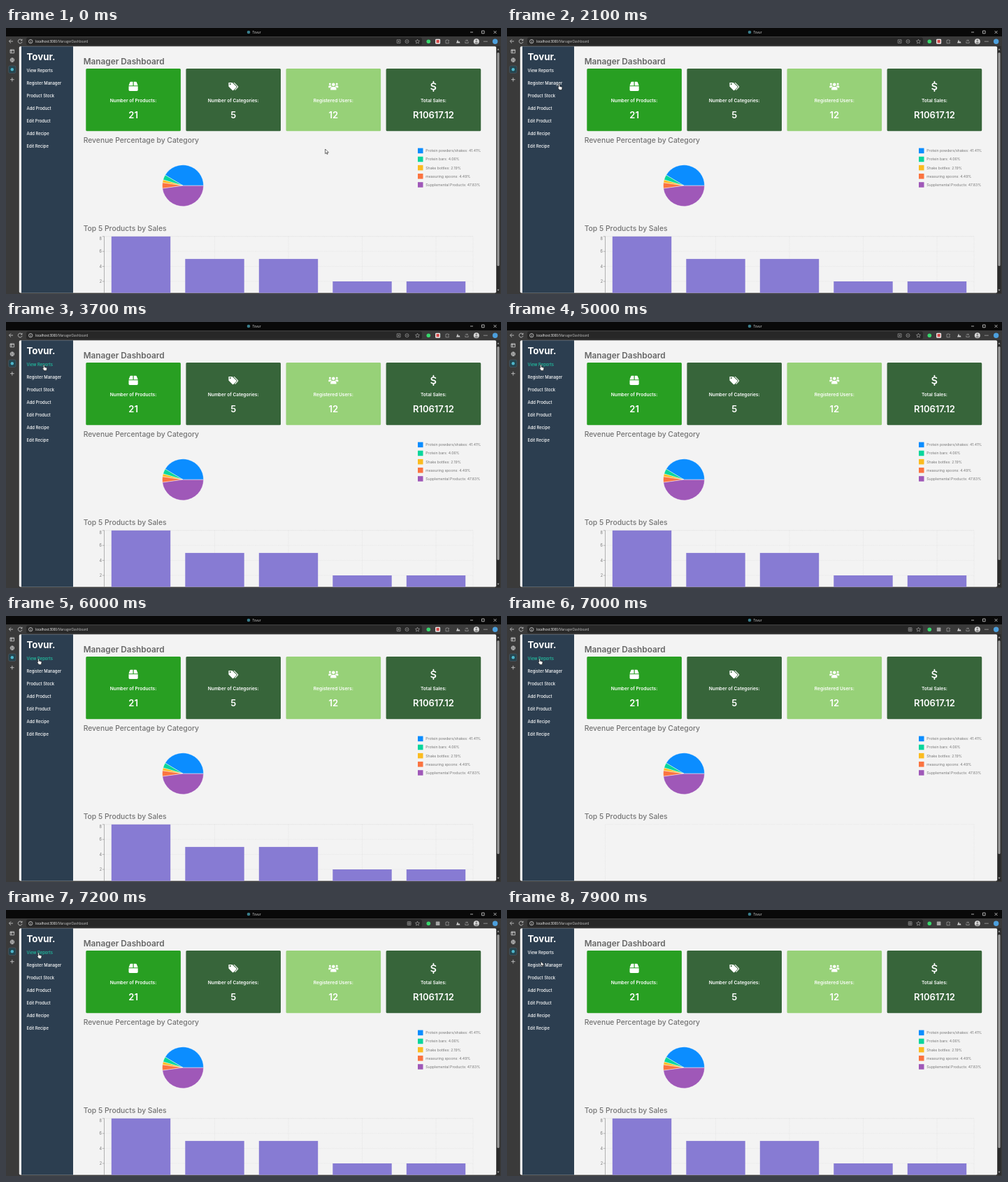
Write an HTML page that moves like this. It is 708 px wide and 380 px high and loops after 8000 ms.

```html
<!DOCTYPE html>
<html lang="en">
<head>
<meta charset="utf-8">
<title>Manager Dashboard</title>
<style>
html, body { margin: 0; width: 100%; height: 100%; overflow: hidden; background: #3a3a3a; }
svg { display: block; width: 708px; height: 380px; font-family: Inter, sans-serif; }
.chrome { font-family: "Open Sans", sans-serif; }
.line { fill: none; stroke: #d0d0d0; stroke-width: .8; }
.card { fill: #fff; font-weight: 600; text-anchor: middle; }
.menu { fill: #fff; font-size: 5.9px; font-weight: 500; }
.heading { fill: #737373; font-size: 10.33px; font-weight: 500; }
.grid { fill: none; stroke: #d4d4d4; stroke-width: .4; stroke-dasharray: 1.1 1.1; }
.cursor { fill: #fff; stroke: #111; stroke-width: .6; stroke-linejoin: round; }
</style>
</head>
<body>
<svg viewBox="0 0 708 380">
  <rect width="708" height="380" fill="#3a3a3a"/>
  <g class="chrome">
    <rect width="708" height="12" fill="#090909"/>
    <circle cx="347" cy="6" r="2.3" fill="#397d8b"/>
    <text x="352.5" y="7.9" font-size="4.7" fill="#d5d5d5">Tovur</text>
    <path class="line" d="M664 6h4M680.5 4h3.6v3.8h-3.6zM697.5 4l4 4m0-4l-4 4"/>
    <rect x="29" y="13.5" width="566" height="11" rx="2.5" fill="#272727"/>
    <path class="line" d="M10 19H4.5m2.5-2.6L4.4 19 7 21.6M22.6 17.4a2.9 2.9 0 1 0 .4 2.4M23 15.8v2h-2"/>
    <circle class="line" cx="35.2" cy="19.2" r="2.7" stroke-width=".6"/>
    <path class="line" d="M35.2 18.8v2m0-3.3v.6"/>
    <text x="42" y="20.9" font-size="4.6" fill="#c3c3c3"><tspan fill="#fff">localhost:3000</tspan>/ManagerDashboard</text>
    <g class="line" style="stroke:#b5b5b5;stroke-width:.6">
      <g id="earlyTools">
        <path d="M559.2 16.8h4.8v4.8h-4.8zM561.6 18v2.4m-1.2-1.2h2.4"/>
        <circle cx="573.5" cy="19.2" r="2.5"/><path d="M572.2 19.2h2.6"/>
      </g>
      <path id="lateTools" d="M574.2 16.8h4.8v4.8h-4.8zM576.6 16.8v4.8m-2.4-2.4h4.8"/>
      <path d="M588.5 16.2l.9 2 2.1.2-1.6 1.5.5 2.1-1.9-1.1-1.9 1.1.5-2.1-1.6-1.5 2.1-.2z"/>
      <path d="M629 17.4h1.3q.7-1.8 1.4 0h1.6v1.6q-1.7.5 0 1.4v1.4H629zM656.8 17.8h3.4m-1-1.3l1.2 1.3-1.2 1.4m2 .2v2h-4.4v-2"/>
    </g>
    <circle cx="604.3" cy="19.2" r="2.8" fill="#38d66c"/>
    <rect id="extension" x="614.8" y="16.4" width="5.6" height="5.6" rx=".6"/>
    <path d="M644 21.5l2-5 1 3.2 1.7-.4.8 2.2z" fill="#ccc"/>
    <circle cx="672.8" cy="19.2" r="4" fill="#d9d9d9"/>
    <circle cx="672.8" cy="18" r="1.4" fill="#888"/><path d="M670.1 21.7q2.7-3.8 5.4 0-2.7 2.3-5.4 0" fill="#888"/>
    <path d="M683.4 19.2h5" stroke="#ddd" stroke-width="1" stroke-dasharray="1 1"/>
    <circle cx="699.6" cy="19.2" r="3.7" fill="#4c9fdc"/>
    <rect x="3.5" y="54" width="10.5" height="10.5" rx="2" fill="#24454e" stroke="#667" stroke-width=".4"/>
    <circle cx="8.8" cy="59.2" r="2.2" fill="#4fb6cb"/>
    <path class="line" d="M6 31h5.6v4.8H6zM6 32.2h5.6M7.8 31v4.8M6 73.7h5.6M8.8 70.9v5.6"/>
    <path class="line" stroke-width=".6" d="M11.7 45.7a2.8 2.8 0 1 1-5.6 0a2.8 2.8 0 1 1 5.6 0zH6.1M8.9 42.9q-2.4 2.8 0 5.6q2.4-2.8 0-5.6"/>
  </g>

  <clipPath id="page"><rect x="18.8" y="26.3" width="682.4" height="352.2" rx="2"/></clipPath>
  <g clip-path="url(#page)">
    <rect x="18" y="26" width="684" height="354" fill="#f3f3f3"/>
    <rect x="22" y="26" width="74" height="354" fill="#2c3e50"/>
    <text x="29.5" y="45.8" font-size="13.3" font-weight="700" fill="#fff">Tovur.</text>
    <g id="menu" class="menu"></g>
    <text x="110.7" y="52.3" font-size="11.8" font-weight="600" fill="#666">Manager Dashboard</text>
    <g id="cards" class="card"></g>
    <text class="heading" x="110.7" y="164.3">Revenue Percentage by Category</text>
    <g id="pie" stroke="#fff" stroke-width=".4"></g>
    <g id="legend" font-size="5.16" fill="#777"></g>
    <text class="heading" x="110.7" y="290.2">Top 5 Products by Sales</text>
    <path class="grid" d="M140.5 380V297.7H668V380"/>
    <g id="chart"></g>
  </g>
  <rect x="701.6" y="26" width="5" height="353" fill="#2b2b2b"/>
  <rect x="702.4" y="35" width="3.2" height="305" rx="1.6" fill="#9b9b9b"/>
  <path d="M702.5 31.5l1.5-2.2 1.5 2.2zM702.5 373.5l1.5 2.2 1.5-2.2z" fill="#aaa"/>

  <path id="arrow" class="cursor" d="M0 0V6.6L1.6 5.1 2.6 7.4 3.6 7 2.6 4.8H4.8Z"/>
  <path id="hand" class="cursor" d="M1.2 1Q2 0 2.8 1V3.8L5.8 4.7Q6.6 5 6.4 6L5.7 9H2.4L.1 5.9Q.2 4.6 1.2 5.5Z"/>
</svg>
<script>
const LOOP = 8000, STEP = 100;
const $ = id => document.getElementById(id);
const fill = (id, items, draw) => { $(id).innerHTML = items.map(draw).join(""); };
const show = (id, on) => $(id).setAttribute("visibility", on ? "visible" : "hidden");

fill("menu", ["View Reports", "Register Manager", "Product Stock", "Add Product", "Edit Product", "Add Recipe", "Edit Recipe"],
  (label, i) => `<text x="29.5" y="${62.6 + i * 18.05}">${label}</text>`);

// Card icons are drawn around their own centre.
const icons = {
  box: `<path d="M-6.6-1.2L-4.8-5.9Q-4.5-6.6-3.7-6.6H-.6V-1.2zM.6-1.2V-6.6H3.7Q4.5-6.6 4.8-5.9L6.6-1.2zM-6.6-.2H6.6V5.2Q6.6 6.6 5.2 6.6H-5.2Q-6.6 6.6-6.6 5.2z"/>`,
  tags: `<path fill-rule="evenodd" d="M-6.8-5.5H-1.6L4.3 0Q4.9.7 4.3 1.4L.1 5.5Q-.6 6.1-1.3 5.5L-6.8 0zM-4.5-4.3a1 1 0 1 0 .1 0z"/><path d="M.1-5.5H1.5L6.7-.1Q7.3.7 6.7 1.4L2.7 5.6 1.9 4.9 5.4 1.2Q6 .6 5.4 0z"/>`,
  users: `<circle cy="-2.6" r="2.3"/><circle cx="-4.9" cy="-3.3" r="1.5"/><circle cx="4.9" cy="-3.3" r="1.5"/><path d="M-4.2 5V3.5Q-4 .6-1.8.6H1.8Q4 .6 4.2 3.5V5zM-7 1.8V.2Q-6.8-1.2-5.5-1.2H-3.4L-2.6.2Q-4 .7-4.5 1.8zM7 1.8V.2Q6.8-1.2 5.5-1.2H3.4L2.6.2Q4 .7 4.5 1.8z"/>`,
  dollar: `<path d="M3-3.2Q1.8-4.4 0-4.4C-4-4.4-4-.7 0 0S4 4.4 0 4.4Q-2 4.4-3.2 3.2M0-6.8V-4.4M0 4.4V6.8" fill="none" stroke="#fff" stroke-width="1.7" stroke-linecap="round"/>`
};
fill("cards", [
  ["Number of Products:", "21", "#289f22", "box"],
  ["Number of Categories:", "5", "#37653a", "tags"],
  ["Registered Users:", "12", "#97d178", "users"],
  ["Total Sales:", "R10617.12", "#37653a", "dollar"]
], ([label, value, color, icon], i) => `<g transform="translate(${182.1 + i * 143.1})">
  <rect x="-67.8" y="58" width="135.6" height="89.3" rx="1.5" fill="${color}"/>
  <g transform="translate(0 83.4)">${icons[icon]}</g>
  <text y="106.4" font-size="6.64">${label}</text>
  <text y="128.7" font-size="13">${value}</text></g>`);

const shares = [
  ["Protein powders/shakes", "41.41", "#0b8dff"],
  ["Protein bars", "4.06", "#0ad69c"],
  ["Shake bottles", "2.19", "#fbbc20"],
  ["measuring spoons", "4.49", "#fb7440"],
  ["Supplemental Products", "47.83", "#9f58b8"]
];
fill("legend", shares, ([name, share, color], i) => `
  <rect x="589" y="${171.6 + i * 12.15}" width="7.5" height="7.5" fill="${color}"/>
  <text x="600.3" y="${177.2 + i * 12.15}">${name}: ${share}%</text>`);

const rim = part => {
  const a = part / 100 * 2 * Math.PI;
  return `${253 + 29.5 * Math.cos(a)} ${225.2 - 29.5 * Math.sin(a)}`;
};
let sum = 0;
fill("pie", shares, ([, share, color]) => {
  const from = sum;
  sum += +share;
  return `<path fill="${color}" d="M253 225.2L${rim(from)}A29.5 29.5 0 0 0 ${rim(sum)}Z"/>`;
});

const level = n => 383.4 - n * 10.7;
$("chart").innerHTML =
  [2, 4, 6, 8].map(n => `<path class="grid" d="M140.5 ${level(n)}H668"/>
    <path d="M137.8 ${level(n)}h2.7" stroke="#777" stroke-width=".5"/>
    <text x="137" y="${level(n) + (n === 8 ? 5.2 : 1.9)}" font-size="5.5" fill="#777" text-anchor="end">${n}</text>`).join("") +
  `<path d="M140.5 297.7V380" stroke="#777" stroke-width=".5"/>` +
  [8, 5, 5, 2, 2].map((n, i) => `<path class="grid" d="M${193 + i * 105.5} 297.7V380"/>
    <rect x="${150.8 + i * 105.5}" y="${level(n)}" width="84.4" height="100" fill="#877bd3"/>`).join("");

// time, x, y, cursor shape
const moves = [
  [0, 456.6, 173, "arrow"], [600, 411.4, 197.4, "arrow"], [800, 399.4, 199.4, "arrow"],
  [2100, 72.6, 79.6, "hand"], [2200, 63, 70, "hand"], [2300, 54, 61.5, "hand"], [2500, 52.2, 60.3, "hand"],
  [3200, 52.4, 62.5, "hand"], [3500, 52.2, 60.6, "hand"], [5000, 46.4, 60.4, "hand"],
  [5500, 40.6, 68, "hand"], [6000, 44.6, 60.4, "hand"],
  [7600, 45.5, 63, "hand"], [7700, 47, 69, "arrow"], [7800, 48.4, 73.6, "arrow"]
];
const ramp = (t, start, length) => Math.min(1, Math.max(0, (t - start) / length));
const white = [255, 255, 255], teal = [32, 196, 164];

function render(t) {
  const [, x, y, shape] = moves.findLast(m => m[0] <= t);
  for (const id of ["arrow", "hand"]) show(id, id === shape);
  $(shape).setAttribute("transform", `translate(${x} ${y})`);

  const hover = ramp(t, 2300, 300) - ramp(t, 7500, 300);
  $("menu").firstElementChild.style.fill =
    `rgb(${white.map((c, i) => c + (teal[i] - c) * hover)})`;

  const reloaded = t >= 6400;
  show("earlyTools", !reloaded);
  show("lateTools", reloaded);
  $("extension").setAttribute("style", reloaded ? "fill:#a5a5a5" : "fill:#d34848;stroke:#eee;stroke-width:1.4");
  show("chart", !reloaded || t >= 7200);
}

function tick(now) {
  render(Math.floor(now % LOOP / STEP) * STEP);
  requestAnimationFrame(tick);
}
tick(performance.now());
</script>
</body>
</html>
```
